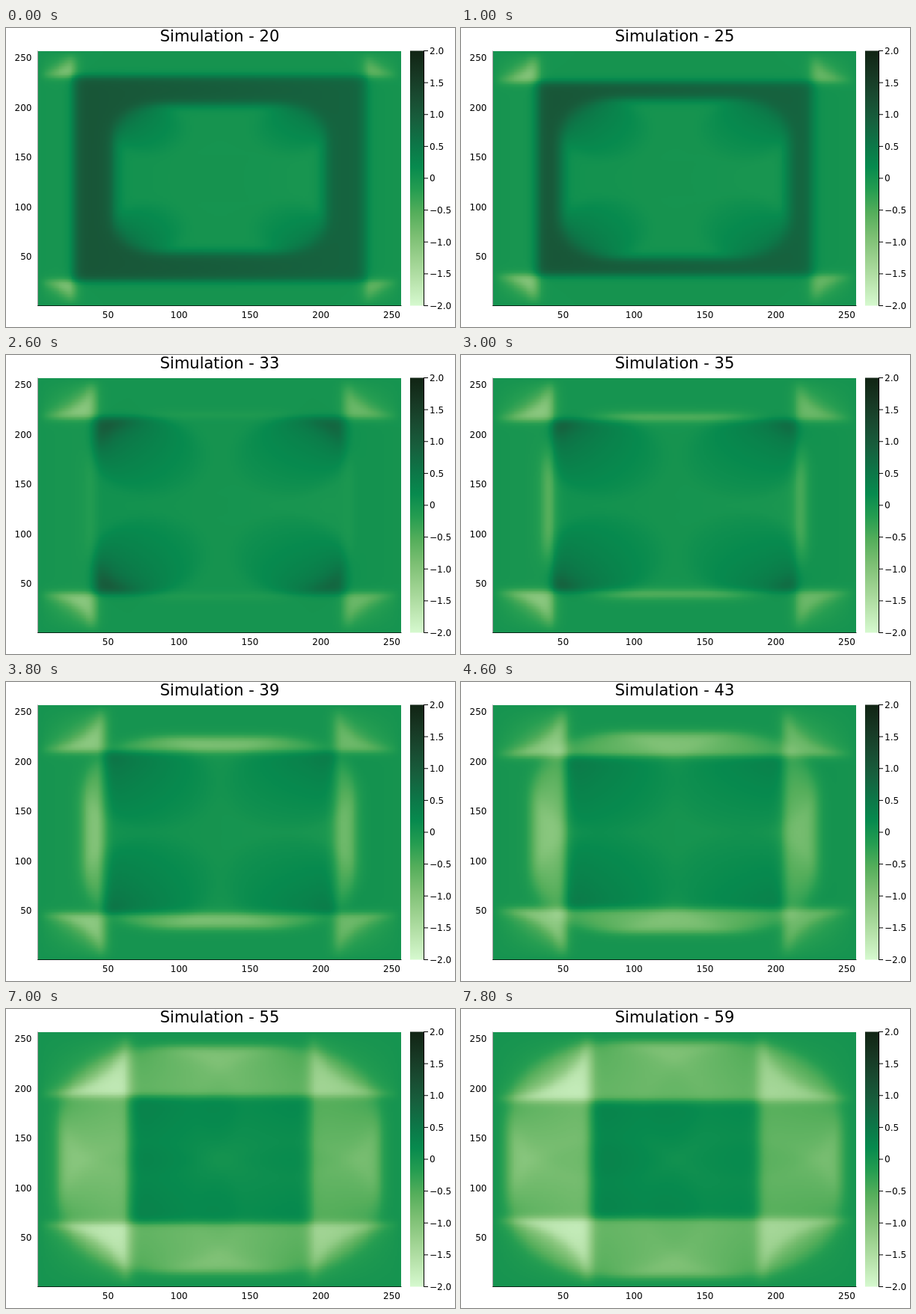
Recreate the animation shown at these times as an HTML page with a canvas. Size 600 px wide and 400 px high, loop 8 s.

```html
<!DOCTYPE html>
<html lang="en">
<head>
<meta charset="utf-8">
<title>Simulation</title>
<style>
  html, body { margin: 0; width: 100%; height: 100%; overflow: hidden; background: #fff; }
  canvas { position: absolute; left: 42.5px; top: 30.5px; width: 485.5px; height: 341px; image-rendering: pixelated; }
  svg { position: absolute; left: 0; top: 0; font: 12px "DejaVu Sans", sans-serif; }
</style>
</head>
<body>
<canvas id="field" width="256" height="256"></canvas>
<svg id="chart" width="600" height="400" viewBox="0 0 600 400">
  <defs><linearGradient id="scale" x1="0" y1="1" x2="0" y2="0"></linearGradient></defs>
  <rect x="540" y="30.5" width="18" height="341" fill="url(#scale)"/>
  <path d="M558.5 30.5V371.5" stroke="#000" fill="none"/>
  <path d="M42 371.5H528.5" stroke="#000" stroke-opacity=".75" fill="none"/>
  <path d="M42.5 30.5V371.5" stroke="#000" stroke-opacity=".4" fill="none"/>
  <text id="title" x="285.5" y="18" font-size="21" text-anchor="middle"></text>
</svg>
<script>
const N = 256, FIRST = 20, COUNT = 40, STEP_MS = 200;
const K = 0.555;               // wave travel per substep, in cells
const algae = [
  [214, 249, 207], [186, 228, 174], [156, 209, 143], [124, 191, 115],
  [85, 174, 91], [37, 157, 81], [7, 138, 78], [13, 117, 71],
  [23, 95, 61], [25, 75, 49], [23, 55, 35], [17, 36, 20]
];

const svg = document.getElementById("chart");
const title = document.getElementById("title");
const ctx = document.getElementById("field").getContext("2d");

function add(parent, tag, attrs, text) {
  const el = document.createElementNS("http://www.w3.org/2000/svg", tag);
  for (const k in attrs) el.setAttribute(k, attrs[k]);
  if (text !== undefined) el.textContent = text;
  parent.appendChild(el);
}

function drawAxes() {
  for (let v = 50; v <= 250; v += 50) {
    add(svg, "text", { x: 41.75 + v * 1.895, y: 387.5, "text-anchor": "middle" }, v);
    add(svg, "text", { x: 34.5, y: 377 - v * 1.332, "text-anchor": "end" }, v);
  }
  for (let i = 0; i <= 8; i++) {
    const v = 2 - i / 2, y = 30.5 + i * 42.625;
    const label = v === 0 ? "0" : v.toFixed(1).replace("-", "\u2212");
    add(svg, "path", { d: `M558 ${y}H564`, stroke: "#000" });
    add(svg, "text", { x: 566, y: y + 4.4 }, label);
  }
  const scale = document.getElementById("scale");
  algae.forEach((c, i) => add(scale, "stop", { offset: i / 11, "stop-color": `rgb(${c})` }));
}

// Colour table over the range -2..2
const lut = Array.from({ length: 512 }, (_, i) => {
  const p = i / 511 * 11, a = Math.min(10, Math.floor(p));
  return algae[a].map((c, j) => Math.round(c + (algae[a + 1][j] - c) * (p - a)));
});

// Smooth profiles along one axis: wall edge, central box and the box's slope
const wall = x => Math.tanh(x / 4.4) * Math.tanh((N - x) / 4.4);
const side = d => (1 + Math.tanh(d / 5.3)) / 2;
const box = x => side(x - 79) * side(N - 79 - x);
const slope = x => Math.abs(box(x + 0.5) - box(x - 0.5));

// Wave equation with fixed walls; the central hole starts out growing outwards
function simulate() {
  const W = N + 2, frames = [];
  let prev = new Float32Array(W * W), cur = new Float32Array(W * W);
  const axis = f => Float32Array.from({ length: W }, (_, i) => f(i - 0.5));
  const w = axis(wall), b = axis(box), s = axis(slope);
  for (let y = 1; y <= N; y++) {
    for (let x = 1; x <= N; x++) {
      const amp = 1.13 - 0.0013 * x, i = y * W + x;
      cur[i] = amp * w[x] * w[y] * (1 - b[x] * b[y]);
      prev[i] = cur[i] + K * amp * (s[x] * b[y] + b[x] * s[y]);
    }
  }
  const laplace = (u, i) => u[i - 1] + u[i + 1] + u[i - W] + u[i + W] - 4 * u[i];
  const mirror = u => {
    for (let i = 0; i < W; i++) {
      u[i] = -u[W + i];
      u[(W - 1) * W + i] = -u[(W - 2) * W + i];
      u[i * W] = -u[i * W + 1];
      u[i * W + W - 1] = -u[i * W + W - 2];
    }
  };
  mirror(cur);
  for (let y = 1; y <= N; y++)
    for (let x = 1; x <= N; x++) prev[y * W + x] += K * K / 2 * laplace(cur, y * W + x);

  const last = 2 * (FIRST + COUNT - 1) + 6;
  for (let m = 1; m <= last; m++) {
    for (let y = 1; y <= N; y++)
      for (let x = 1; x <= N; x++) {
        const i = y * W + x;
        prev[i] = 2 * cur[i] - prev[i] + K * K * laplace(cur, i);
      }
    [prev, cur] = [cur, prev];
    mirror(cur);
    if (m % 2 === 0 && m >= 2 * FIRST + 6) frames.push(paint(cur, W));
  }
  return frames;
}

function paint(u, W) {
  const img = new ImageData(N, N);
  for (let y = 0; y < N; y++)
    for (let x = 0; x < N; x++) {
      const v = u[(N - y) * W + x + 1];
      const c = lut[Math.max(0, Math.min(511, Math.round((v + 2) / 4 * 511)))];
      img.data.set([c[0], c[1], c[2], 255], (y * N + x) * 4);
    }
  return img;
}

drawAxes();
const frames = simulate();
const start = performance.now();
let shown = -1;

function update() {
  const k = Math.floor(Math.max(0, performance.now() - start) / STEP_MS) % COUNT;
  if (k !== shown) {
    shown = k;
    ctx.putImageData(frames[k], 0, 0);
    title.textContent = "Simulation - " + (FIRST + k);
  }
  requestAnimationFrame(update);
}
update();
</script>
</body>
</html>
```
